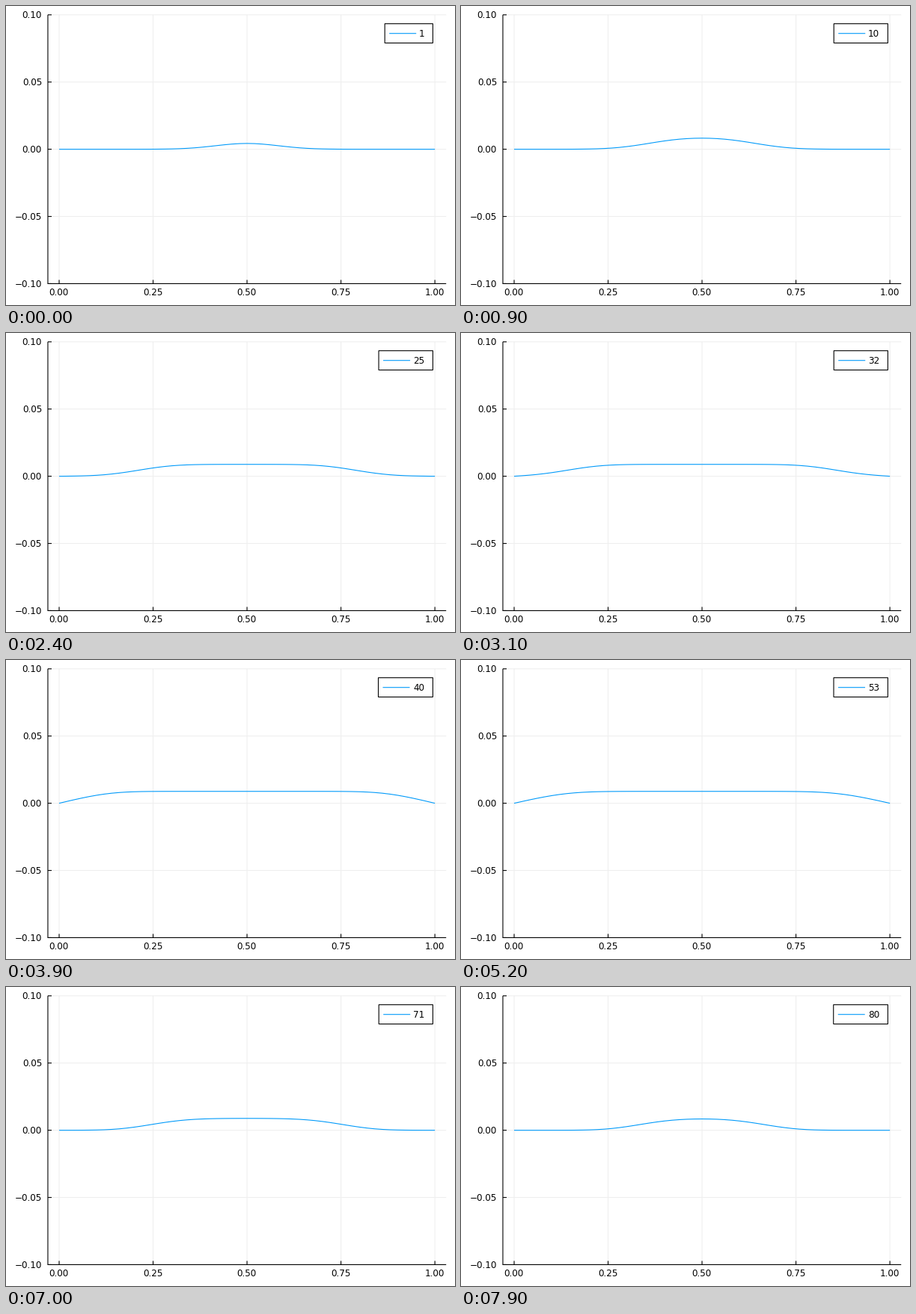
A matplotlib script for the animation above (8000 ms loop, 600 px wide and 400 px high).

```python
import numpy as np
import matplotlib.pyplot as plt
from matplotlib.animation import FuncAnimation
from matplotlib.patches import Rectangle
from matplotlib.textpath import TextPath

W, H, DPI = 600, 400, 100
PX = 72 / DPI
FRAMES, INTERVAL = 80, 100
FONT = 12
BLUE, GRID = "#009afa", "#efefef"
LEFT, RIGHT, TOP, BOTTOM = 55.95, 588.19, 11.81, 371.45
LEGEND_RIGHT, INK_RIGHT = 570.4, 558.5

plt.rcParams["font.family"] = "DejaVu Sans"
plt.rcParams["path.simplify"] = False


def px_x(x):
    return LEFT + (x + 0.03) / 1.06 * (RIGHT - LEFT)


def px_y(y):
    return BOTTOM - (y + 0.1) / 0.2 * (BOTTOM - TOP)


# Wave equation with fixed ends: a Gaussian velocity kick, in the sine modes
# of a central-difference grid.
CELLS, WIDTH, PLATEAU = 50, 0.11, 0.00884
x = np.linspace(0, 1, CELLS + 1)
modes = np.arange(1, CELLS)
sines = np.sin(np.pi * np.outer(x, modes))
omega = 2 * CELLS * np.sin(np.pi * modes / (2 * CELLS))
kick = 2 * PLATEAU / (WIDTH * np.sqrt(np.pi)) * np.exp(-((x - 0.5) / WIDTH) ** 2)
coef = 2 / CELLS * (sines.T @ kick) / omega


def wave(k):
    travel = 0.041 + 0.01 * k
    return sines @ (coef * np.sin(omega * travel))


fig = plt.figure(figsize=(W / DPI, H / DPI), dpi=DPI, facecolor="white")
ax = fig.add_axes([0, 0, 1, 1])
ax.set_xlim(0, W)
ax.set_ylim(H, 0)
ax.axis("off")


def rule(xs, ys, color="black", z=2, width=1.1):
    line, = ax.plot(xs, ys, color=color, lw=width * PX, zorder=z, snap=False,
                    solid_capstyle="butt", solid_joinstyle="round")
    return line


def ink(s):
    """Left bearing and visible width of a string."""
    box = TextPath((0, 0), s, size=FONT).get_extents()
    return box.x0, box.width


def label(v, x_ref, baseline, anchor):
    s = f"{v:.2f}".replace("-", "\u2212")
    bearing, width = ink(s)
    ax.text(x_ref - bearing - anchor * width, baseline, s,
            fontsize=FONT * PX, va="baseline", ha="left")


for v in np.linspace(0, 1, 5):
    p = px_x(v)
    rule([p, p], [TOP, BOTTOM], GRID, 1)
    rule([p, p], [BOTTOM, BOTTOM - 5])
    label(v, p, 387.2, 0.5)

for v in (-0.1, -0.05, 0, 0.05, 0.1):
    p = px_y(v)
    rule([LEFT, RIGHT], [p, p], GRID, 1)
    rule([LEFT, LEFT + 5], [p, p])
    label(v, 47.5, p + 4.3, 1)

rule([LEFT, LEFT], [TOP, BOTTOM + 0.5])
rule([LEFT, RIGHT], [BOTTOM, BOTTOM])

curve = rule(px_x(x), px_y(0 * x), BLUE, 3)
frame = ax.add_patch(Rectangle((0, 23.7), 1, 25.8, fc="white", ec="black",
                               lw=1.1 * PX, zorder=4, snap=False))
sample = rule([0, 1], [36.7, 36.7], BLUE, 5)
count = ax.text(0, 41.2, "", fontsize=FONT * PX, va="baseline", ha="left",
                zorder=5)


def draw(i):
    k = i + 1
    curve.set_ydata(px_y(wave(k)))
    bearing, width = ink(str(k))
    left = LEGEND_RIGHT - 59 - width
    frame.set_x(left)
    frame.set_width(LEGEND_RIGHT - left)
    sample.set_xdata([left + 6, left + 42])
    count.set_text(str(k))
    count.set_x(INK_RIGHT - width - bearing)
    return curve, frame, sample, count


anim = FuncAnimation(fig, draw, frames=FRAMES, interval=INTERVAL,
                     repeat=True, repeat_delay=0, blit=False)
plt.show()
```
